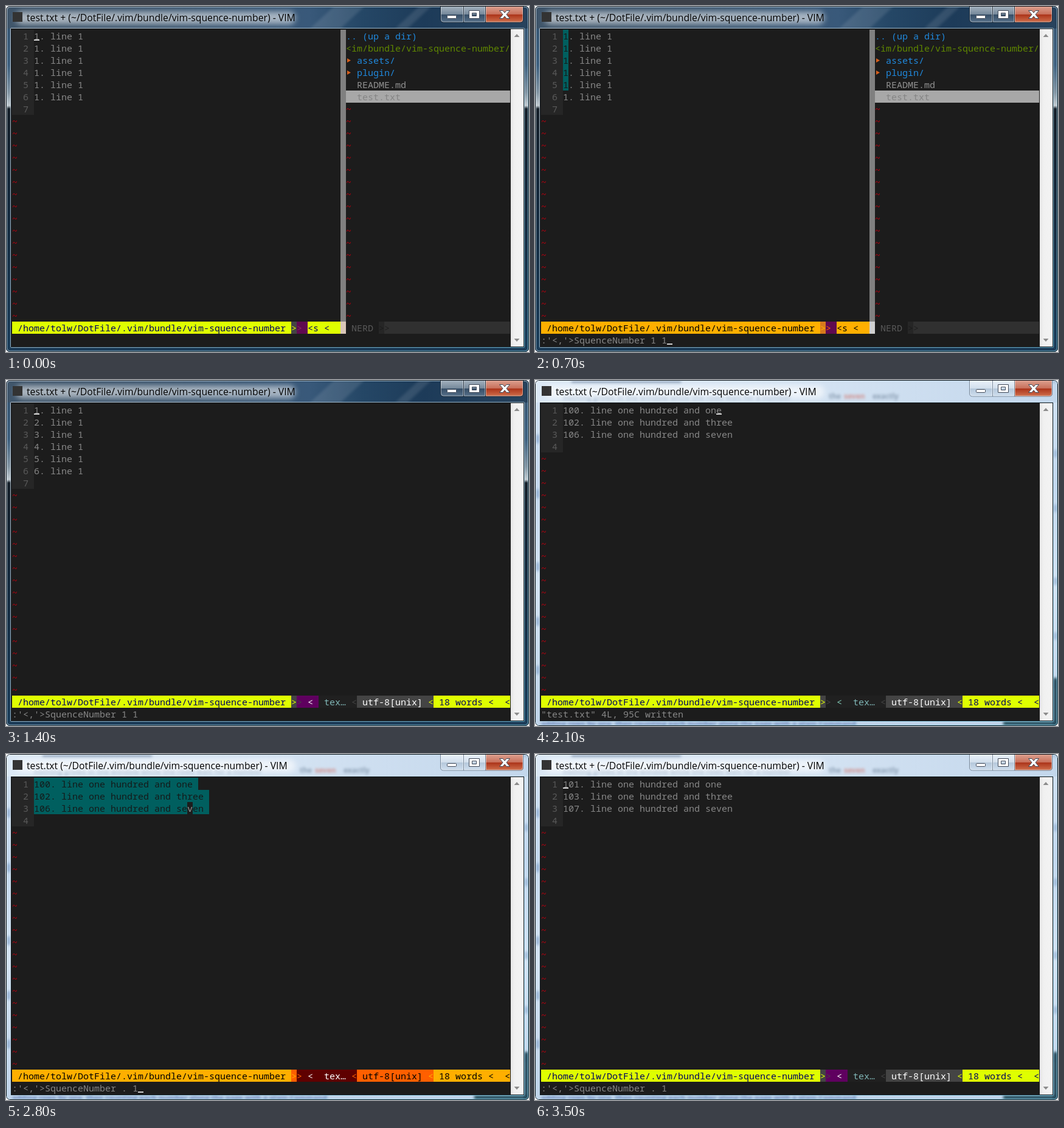
An HTML page for the animation above (4200 ms loop, 860 by 569 pixels).

```html
<!DOCTYPE html>
<html lang="en">
<head>
<meta charset="utf-8">
<title>Sequence numbers in Vim</title>
<style>
html, body { margin: 0; width: 100%; height: 100%; overflow: hidden; background: #fff; }
svg { display: block; }
text { white-space: pre; }
.mono { font: 15px "Noto Sans Mono", monospace; }
.title { font: 15.75px "Open Sans", sans-serif; }
.haze { font: bold 12px "Open Sans", sans-serif; }
</style>
</head>
<body>
<svg id="stage" width="860" height="569" viewBox="0 0 860 569">
  <defs>
    <linearGradient id="darkTop">
      <stop offset="0" stop-color="#40566b"/><stop offset=".3" stop-color="#3c566f"/>
      <stop offset=".58" stop-color="#39597a"/><stop offset=".68" stop-color="#254766"/>
      <stop offset=".8" stop-color="#1d3b59"/><stop offset="1" stop-color="#28435d"/>
    </linearGradient>
    <linearGradient id="darkSide" x2="0" y2="1">
      <stop offset="0" stop-color="#35536f"/><stop offset=".17" stop-color="#3f6180"/>
      <stop offset=".25" stop-color="#8496a4"/><stop offset=".288" stop-color="#c3ccd2"/>
      <stop offset=".297" stop-color="#17212b"/><stop offset=".5" stop-color="#15283a"/>
      <stop offset="1" stop-color="#1c3f5c"/>
    </linearGradient>
    <linearGradient id="lightTop">
      <stop offset="0" stop-color="#dce9f6"/><stop offset=".55" stop-color="#d3e2f2"/>
      <stop offset="1" stop-color="#c3d7ec"/>
    </linearGradient>
    <linearGradient id="lightSide" x2="0" y2="1">
      <stop offset="0" stop-color="#d4e3f3"/><stop offset=".3" stop-color="#c4d8ee"/>
      <stop offset=".6" stop-color="#d5e4f4"/><stop offset="1" stop-color="#bfd3e9"/>
    </linearGradient>
    <linearGradient id="rim" x2="1" y2="1">
      <stop offset="0" stop-color="#e6eef5"/><stop offset=".5" stop-color="#b9d8e8"/>
      <stop offset="1" stop-color="#7fd0ea"/>
    </linearGradient>
    <linearGradient id="darkBtn" x2="0" y2="1">
      <stop offset="0" stop-color="#a3b1be"/><stop offset=".48" stop-color="#76899b"/>
      <stop offset=".5" stop-color="#354d66"/><stop offset="1" stop-color="#57718a"/>
    </linearGradient>
    <linearGradient id="lightBtn" x2="0" y2="1">
      <stop offset="0" stop-color="#eaf2fa"/><stop offset=".48" stop-color="#d2dfec"/>
      <stop offset=".5" stop-color="#b4c7da"/><stop offset="1" stop-color="#cfdfef"/>
    </linearGradient>
    <linearGradient id="closeBtn" x2="0" y2="1">
      <stop offset="0" stop-color="#dda08f"/><stop offset=".48" stop-color="#c8705b"/>
      <stop offset=".5" stop-color="#ab3319"/><stop offset="1" stop-color="#d0704d"/>
    </linearGradient>
    <linearGradient id="track">
      <stop offset="0" stop-color="#e6e6e6"/><stop offset=".3" stop-color="#f0f0f0"/>
      <stop offset="1" stop-color="#f4f4f4"/>
    </linearGradient>
    <filter id="glow" x="-20%" y="-100%" width="140%" height="300%"><feGaussianBlur stdDeviation="5"/></filter>
    <filter id="soft" x="-20%" y="-50%" width="140%" height="200%"><feGaussianBlur stdDeviation="2"/></filter>
    <clipPath id="win"><rect width="860" height="569" rx="7"/></clipPath>
  </defs>
  <g id="view" clip-path="url(#win)"></g>
</svg>
<script>
const CELL = 9, ROW = 20, LEFT = 10, TOP = 39, HOLD = 700;
const BG = '#1c1c1c', FG = '#878787', TEAL = '#005f5f', RED = '#b80010', BLUE = '#2089dd';
const LIME = '#dfff00', AMBER = '#ffaf00', ORANGE = '#ff5f00', GREY = '#444444';
const PLUM = '#5f005f', MAROON = '#5f0000', STATUS = '#202020';
const PATH = '/home/tolw/DotFile/.vim/bundle/vim-squence-number';

const view = document.getElementById('view');
const esc = s => s.replace(/&/g, '&amp;').replace(/</g, '&lt;');
const box = (x, y, w, h, fill, extra = '') =>
  `<rect x="${x}" y="${y}" width="${w}" height="${h}" fill="${fill}" ${extra}/>`;
const label = (x, y, s, fill, cls) => `<text class="${cls}" x="${x}" y="${y}" fill="${fill}">${esc(s)}</text>`;
const fillCells = (col, row, n, color) => box(LEFT + col * CELL, TOP + row * ROW, n * CELL, ROW, color);
const put = (col, row, s, color = FG) => label(LEFT + col * CELL, TOP + row * ROW + 16, s, color, 'mono');
const cursor = (col, row) => box(LEFT + col * CELL, TOP + row * ROW + 16, CELL, 2, '#d0d0d0');

function frameGlass(light) {
  const top = light ? 'url(#lightTop)' : 'url(#darkTop)';
  const side = light ? 'url(#lightSide)' : 'url(#darkSide)';
  let s = box(0, 0, 860, 569, side) + box(0, 0, 860, 37, top);
  if (light) {
    s += '<g filter="url(#soft)" opacity=".55">' +
      box(60, 0, 180, 5, '#56708f') +
      label(46, 33, 'nothing grows in the window while the rows wait for a number', '#7c93ad', 'haze') +
      label(483, 31, 'the', '#51677f', 'haze') + label(508, 31, 'seven', '#d0503c', 'haze') +
      label(555, 31, 'exactly', '#51677f', 'haze') +
      box(720, 0, 140, 4, '#8fa9c4') +
      label(10, 570, 'adding rows by one, then counting each number along the page with a plain Command', '#123c8c', 'haze') +
      [90, 180, 300, 390, 470].map(y => box(0, y, 9, 14, '#7b9cc6') + box(852, y + 25, 8, 12, '#86a5cb')).join('') +
      '</g>' +
      box(770, 561, 90, 8, '#2c5666', 'filter="url(#soft)"') +
      box(852, 490, 8, 79, '#274b5d', 'filter="url(#soft)"');
  } else {
    s += box(0, 561, 860, 8, '#1d3d59') +
      '<path d="M500 37L540 0H590L550 37ZM640 37L680 0H700L660 37Z" fill="#fff" opacity=".1" filter="url(#soft)"/>';
  }
  s += box(16, 9, 460, 21, '#fff', `rx="10" opacity="${light ? .6 : .55}" filter="url(#glow)"`);
  s += `<rect x=".5" y=".5" width="859" height="568" rx="6.5" fill="none" stroke="#10161c"/>
    <rect x="1.5" y="1.5" width="857" height="566" rx="5.5" fill="none" stroke="url(#rim)" stroke-opacity=".8"/>`;
  return s;
}

function buttons(light) {
  const glass = light ? 'url(#lightBtn)' : 'url(#darkBtn)';
  const edge = light ? '#75879a' : '#1b2a39';
  const icon = 'fill="#fff" stroke="#424b5a" stroke-width="1"';
  return `<path d="M714.5 1V22q0 5 5 5H752V1Z" fill="${glass}"/>
    <path d="M752 1H789V27H752Z" fill="${glass}"/>
    <path d="M789 1H850.5V22q0 5-5 5H789Z" fill="url(#closeBtn)"/>
    <path d="M714.5 1V22q0 5 5 5H845.5q5 0 5-5V1M752.5 1V27M788.5 1V27" fill="none" stroke="${edge}"/>
    <path d="M715.5 1V22q0 4 4 4H751.5V1M753.5 1V26H787.5V1M789.5 1V26H845.5q4 0 4-4V1" fill="none" stroke="#fff" stroke-opacity=".45"/>
    <rect x="725.5" y="15.5" width="15" height="5" rx="1" ${icon}/>
    <path fill-rule="evenodd" d="M761.5 7.5h17v13h-17ZM766.5 11.5v5h7v-5Z" ${icon}/>
    <path d="M811.5 7.5h5.5l3 3.7 3-3.7h5.5l-5.6 6.5 5.6 6.5h-5.5l-3-3.7-3 3.7h-5.5l5.6-6.5Z" ${icon}/>`;
}

function client() {
  return '<rect x="7.5" y="36.5" width="845" height="525" rx="1" fill="none" stroke="url(#rim)" stroke-opacity=".75"/>' +
    `<rect x="8.5" y="37.5" width="843" height="523" fill="${BG}" stroke="#10161c"/>` +
    box(830, 38, 21, 522, 'url(#track)') +
    '<path d="M835.5 51l4.5-5 4.5 5Z M835.5 547l4.5 5 4.5-5Z" fill="#8c8c8c"/>';
}

function buffer(lines, picked) {
  const n = lines.length + 1;
  let s = box(LEFT, TOP, 4 * CELL, n * ROW, '#262626');
  for (let r = 0; r < 24; r++) {
    s += r < n ? put(2, r, String(r + 1), '#5a5a5a') : put(0, r, '~', RED);
  }
  lines.forEach((line, r) => {
    const w = picked ? picked(line, r) : 0;
    if (w) s += fillCells(4, r, w, TEAL) + put(4, r, line.slice(0, w), '#141a1a');
    s += put(4 + w, r, line.slice(w));
  });
  return s;
}

function tree() {
  let s = box(550, TOP, CELL, 24 * ROW, '#808080');
  s += put(61, 0, '.. (up a dir)', BLUE) + put(61, 1, '<im/bundle/vim-squence-number/', '#5f8700');
  ['assets/', 'plugin/'].forEach((name, i) => {
    const y = TOP + (i + 2) * ROW + 7;
    s += `<path d="M561 ${y}l6 3.5-6 3.5Z" fill="#d75f1c"/>` + put(63, i + 2, name, BLUE);
  });
  s += put(63, 4, 'README.md', '#8f8f8f') + fillCells(61, 5, 30, '#a8a8a8') + put(63, 5, 'test.txt', '#858585');
  for (let r = 6; r < 24; r++) s += put(61, r, '~', RED);
  return s;
}

// The status line; mod colours the strip after the path when the file has changed.
function status({ visual, split, mod }) {
  const main = visual ? AMBER : LIME, ink = visual ? '#000000' : '#00005f';
  const mid = visual ? ORANGE : GREY;
  const strip = mod || STATUS;
  let s = fillCells(0, 24, 91, STATUS) + fillCells(0, 24, 51, main) + put(1, 24, PATH, ink);
  s += fillCells(51, 24, 1, split && visual ? '#d77a1c' : mid) + put(51, 24, '>', main);
  if (split) {
    s += fillCells(52, 24, 2, '#5f0a50') + put(52, 24, '>', visual ? ORANGE : '#85305f') +
      fillCells(54, 24, 6, main) + put(54, 24, '<s <', ink) +
      fillCells(60, 24, 1, visual ? '#d0d0d0' : '#d9c6b8') +
      fillCells(61, 24, 6, BG) + put(62, 24, 'NERD', '#585858') +
      fillCells(67, 24, 1, '#262626') + fillCells(68, 24, 23, '#303030') +
      put(67, 24, '>', BG) + put(68, 24, '>', '#1f1f1f');
    return s;
  }
  s += fillCells(52, 24, visual ? 11 : 4, strip) + put(52, 24, '>', mid) +
    put(54, 24, '<', mod ? '#ffffff' : '#85cfbb') +
    put(57, 24, 'tex…', visual ? '#ffffff' : '#7fb5b5') + put(62, 24, '<', mid) +
    fillCells(63, 24, 14, mid) + put(64, 24, 'utf-8[unix]', visual ? '#000000' : '#ffffff') +
    put(76, 24, '<', main) + fillCells(77, 24, 14, main) +
    put(78, 24, '18 words', ink) + put(87, 24, '<', ink) + put(90, 24, '<', ink);
  return s;
}

const ones = n => Array.from({ length: 6 }, (_, i) => `${1 + i * n}. line 1`);
const hundreds = add => ['one', 'three', 'seven'].map((w, i) => `${[100, 102, 106][i] + add}. line one hundred and ${w}`);
const run = args => `:'<,'>SquenceNumber ${args}`;

const scenes = [
  { lines: ones(0), split: true, mod: PLUM, at: [4, 0], cmd: '' },
  { lines: ones(0), split: true, visual: true, mod: PLUM, at: [23, 25], cmd: run('1 1'), picked: (l, r) => r < 5 ? 1 : 0 },
  { lines: ones(1), mod: PLUM, at: [4, 0], cmd: run('1 1') },
  { lines: hundreds(0), light: true, saved: true, at: [32, 0], cmd: '"test.txt" 4L, 95C written' },
  { lines: hundreds(0), light: true, saved: true, visual: true, mod: MAROON, at: [23, 25], cmd: run('. 1'),
    picked: l => l.length + 1, block: [32, 2, 'v'] },
  { lines: hundreds(1), light: true, mod: PLUM, at: [4, 0], cmd: run('. 1') }
];

function render(sc) {
  const name = `test.txt ${sc.saved ? '' : '+ '}(~/DotFile/.vim/bundle/vim-squence-number) - VIM`;
  let s = frameGlass(sc.light) + buttons(sc.light) + box(11, 10, 16, 16, '#333333') +
    label(34, 25, name, '#000', 'title') + client() + buffer(sc.lines, sc.picked);
  if (sc.split) s += tree();
  s += status(sc) + put(0, 25, sc.cmd) + cursor(...sc.at);
  if (sc.block) {
    const [col, row, ch] = sc.block;
    s += fillCells(col, row, 1, BG) + put(col, row, ch, '#9a9a9a');
  }
  return s;
}

let shown = -1;
const start = performance.now();
function tick() {
  const t = Math.max(0, performance.now() - start);
  const i = Math.floor(t / HOLD) % scenes.length;
  if (i !== shown) view.innerHTML = render(scenes[shown = i]);
  requestAnimationFrame(tick);
}
tick();
</script>
</body>
</html>
```
